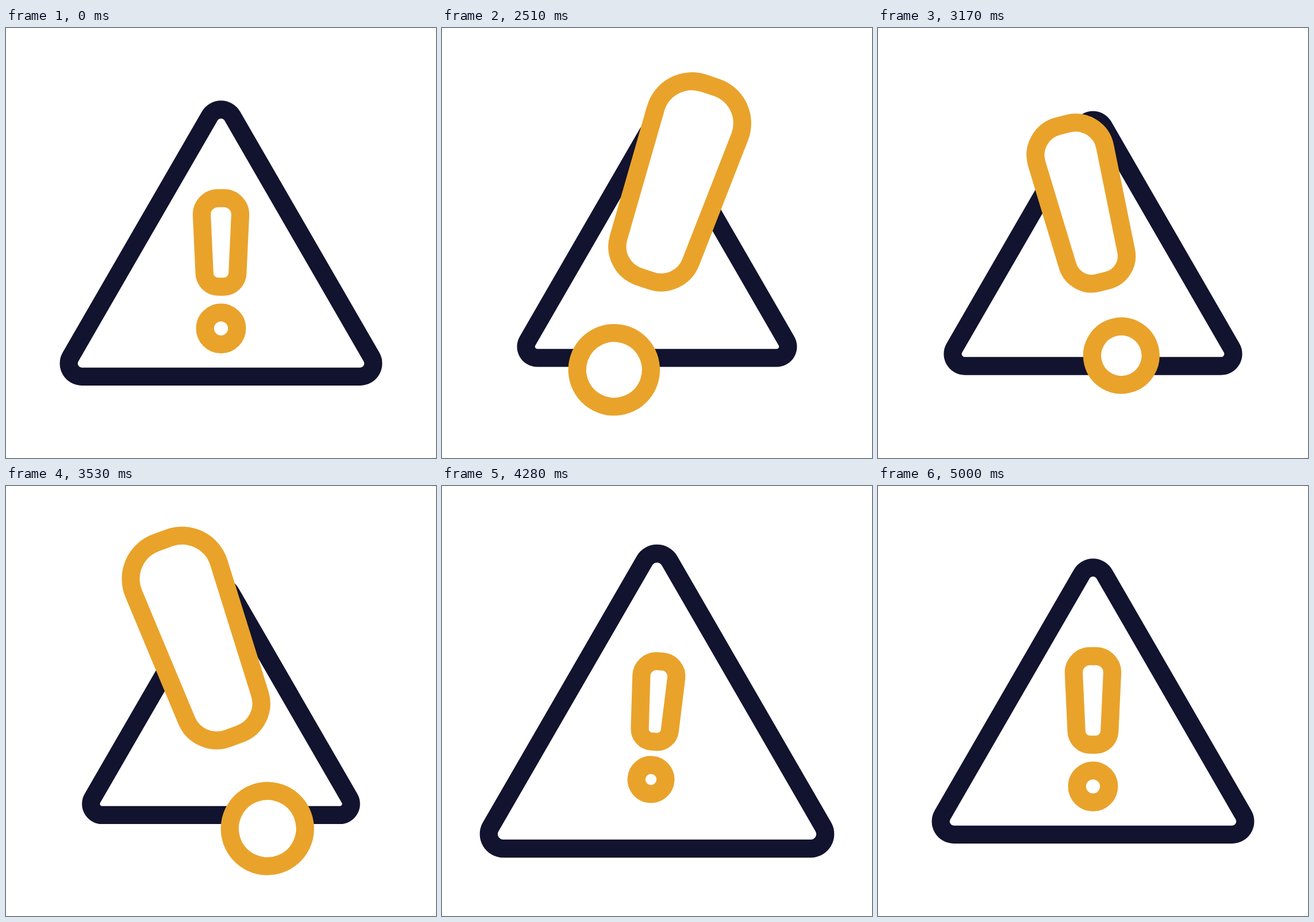
Animation, 748 px wide and 748 px high, one loop 5030 ms. Source, as an HTML page:

```html
<!DOCTYPE html>
<html lang="en">
<head>
<meta charset="utf-8">
<title>Warning</title>
<style>
  html, body { margin: 0; width: 100%; height: 100%; overflow: hidden; background: #fff; }
  svg { display: block; width: 100%; height: 100%; }
  path, circle { fill: #fff; }
  #triangle { stroke: #12132e; }
  #mark { stroke: #e9a32b; }
</style>
</head>
<body>
<svg viewBox="-374 -374 748 748">
  <g id="triangle">
    <path d="M-19.75-220.7A22.8 22.8 0 0 1 19.75-220.7L261.75 198.1A22.8 22.8 0 0 1 242 232.3H-242A22.8 22.8 0 0 1-261.75 198.1Z"/>
  </g>
  <g id="mark">
    <path d="M-33.47-48.2A28.5 28.5 0 0 1-5-78H5A28.5 28.5 0 0 1 33.47-48.2L28.77 53.1A24 24 0 0 1 4.8 76H-4.8A24 24 0 0 1-28.77 53.1Z"/>
    <circle cy="148.6" r="27.8"/>
  </g>
</svg>
<script>
const LOOP = 5030, REST = 2000, STEP = 30, LINE = 31.3;

// Keys are [ms after the rest, value], eased in and out between neighbours.
const triangleScale = [[0, 1], [400, .8515], [970, .9435], [1595, .8515], [1750, .8515], [2195, 1.1206], [2600, .985], [3000, 1]];
const markScale = [[0, 1], [400, 2.38], [970, 1.61], [1530, 2.355], [1610, 2.355], [2200, .897], [2600, 1.015], [3000, 1]];
const markAngle = [[0, 0], [400, 20], [1415, -20], [1670, -20], [2200, 5], [2600, -.8], [3000, 0]];

const triangle = document.getElementById('triangle');
const mark = document.getElementById('mark');

function valueAt(keys, t) {
  const i = keys.findIndex(key => key[0] > t);
  if (i < 0) return keys[keys.length - 1][1];
  const [t0, a] = keys[i - 1], [t1, b] = keys[i];
  const u = (t - t0) / (t1 - t0);
  return a + (b - a) * u * u * (3 - 2 * u);
}

// The line keeps its weight while the shape changes size.
function place(group, scale, before = '') {
  group.setAttribute('transform', `${before}scale(${scale})`);
  group.setAttribute('stroke-width', LINE / scale);
}

function draw(now) {
  const t = Math.max(0, Math.floor((now % LOOP - REST) / STEP) * STEP);
  const scale = valueAt(markScale, t);
  const lift = (1 - scale) * (scale > 1 ? 84 : 20);
  place(triangle, valueAt(triangleScale, t));
  place(mark, scale, `rotate(${valueAt(markAngle, t)}) translate(0 ${lift}) `);
}

const start = performance.now();
function tick() {
  draw(performance.now() - start);
  requestAnimationFrame(tick);
}
tick();
</script>
</body>
</html>
```
